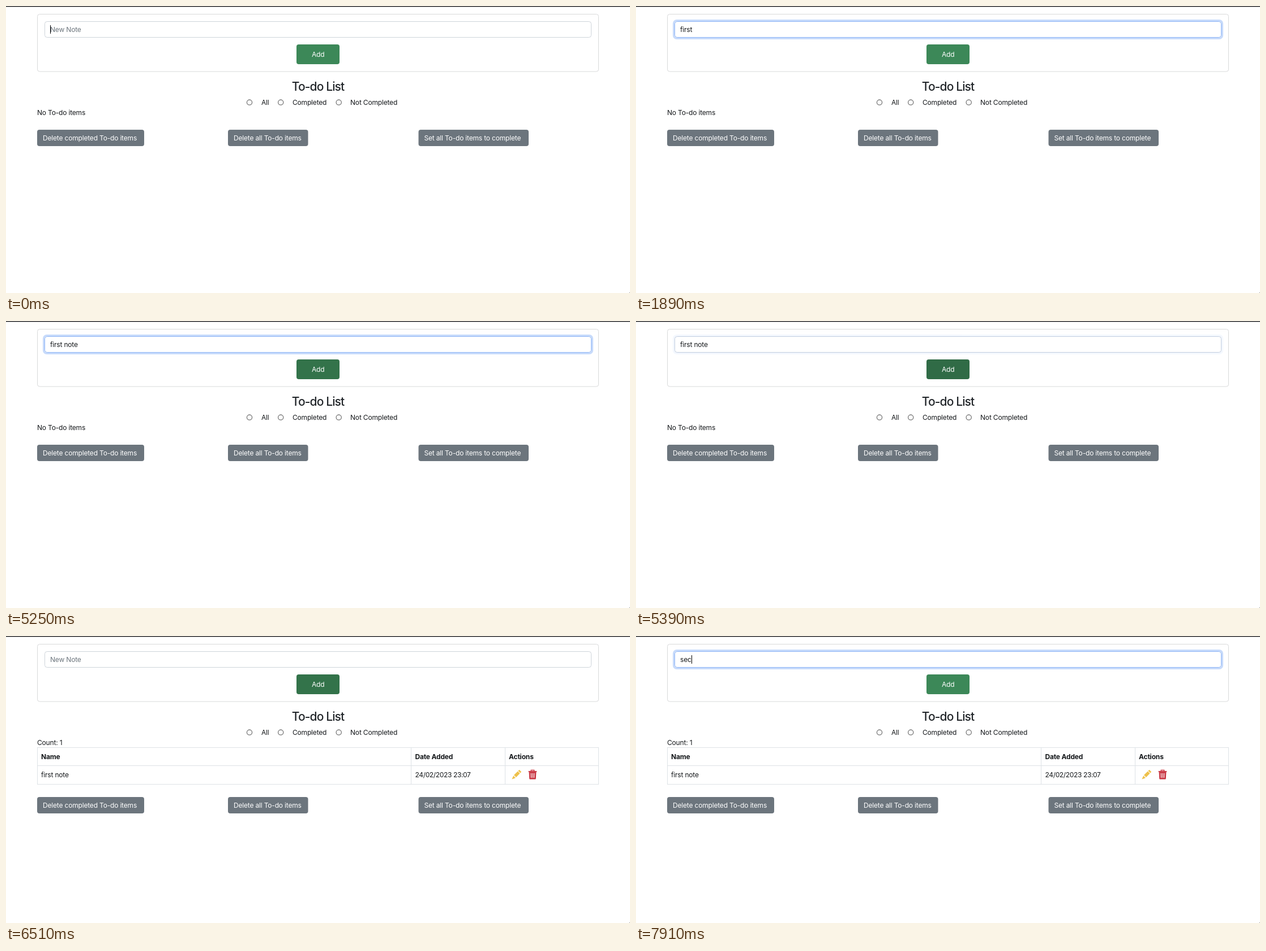
An HTML page that plays this animation: 1102x508 px, repeating every 8000 ms.

```html
<!DOCTYPE html>
<html lang="en">
<head>
<meta charset="utf-8">
<title>To-do List</title>
<style>
  html, body { margin: 0; width: 100%; height: 100%; overflow: hidden; background: #fff; }
  svg { display: block; width: 1102px; height: 508px; }
  text {
    font: 12px Inter, "Open Sans", sans-serif;
    font-optical-sizing: none;
    letter-spacing: -.015em;
    fill: #15181b;
    white-space: pre;
  }
  .title { font-size: 21px; font-weight: 500; letter-spacing: -.042em; text-anchor: middle; fill: #212529; }
  .head { font-weight: 700; }
  .date { letter-spacing: -.03em; }
  .hint { fill: #6c757d; }
  .light, .buttons text { fill: #fff; }
  .buttons rect { fill: #6c757d; }
  .line { fill: none; stroke: #dee2e6; }
  .radio { fill: #fff; stroke: #767676; stroke-width: 1.3; }

  .ring, .add, .empty, .list, .base, .icons, .buttons { animation: 8s steps(1) infinite; }
  .ring { animation-name: focus; }
  .add { animation-name: press; }
  .empty { animation-name: leave; }
  .list { animation-name: enter; }
  .icons { animation-name: icons; }
  .base { animation-name: grow; }
  .buttons { animation-name: shift; }

  @keyframes focus {
    0% { opacity: 0; }
    .875% { opacity: .35; }
    1.75% { opacity: .8; }
    2.625% { opacity: 1; }
    66.5% { opacity: .65; }
    67.375% { opacity: .2; }
    68.25% { opacity: 0; }
    86.625% { opacity: .35; }
    87.5% { opacity: .8; }
    88.375%, 100% { opacity: 1; }
  }
  @keyframes press {
    0% { fill: #3c8858; }
    63% { fill: #388051; }
    63.875% { fill: #34764c; }
    64.75% { fill: #33734a; }
    66.5% { fill: #317048; }
    67.375% { fill: #306b46; }
    69.125% { fill: #317048; }
    70% { fill: #33734a; }
    82.25% { fill: #367a50; }
    83.125% { fill: #3a8455; }
    84%, 100% { fill: #3c8858; }
  }
  @keyframes leave { 0% { opacity: 1; } 68.25%, 100% { opacity: 0; } }
  @keyframes enter { 0% { opacity: 0; } 68.25%, 100% { opacity: 1; } }
  @keyframes icons { 0% { opacity: 0; } 69.125%, 100% { opacity: 1; } }
  @keyframes grow { 0% { transform: none; } 69.125%, 100% { transform: translateY(1px); } }
  @keyframes shift {
    0% { transform: none; }
    68.25% { transform: translateY(64px); }
    69.125%, 100% { transform: translateY(66px); }
  }
</style>
</head>
<body>
<svg viewBox="0 0 1102 508">
  <rect width="1102" height="1.4" fill="#1b1b1d"/>
  <rect x="1101" y="507" width="1" height="1" fill="#777"/>

  <rect x="55.5" y="14.5" width="991" height="101.5" rx="4" fill="#fff" stroke="#d8d9da"/>
  <rect x="68.5" y="27.5" width="965" height="28" rx="4" fill="#fff" stroke="#ced4da"/>
  <g class="ring">
    <rect x="66.5" y="25.5" width="969" height="32" rx="5.5" fill="none" stroke="#c6dafb" stroke-width="3"/>
    <rect x="68.5" y="27.5" width="965" height="28" rx="4" fill="#fff" stroke="#8fb6f6"/>
  </g>
  <text id="field" x="78" y="46"></text>
  <rect id="caret" y="34" width="1" height="15"/>

  <rect class="add" x="513" y="68" width="76" height="35" rx="4"/>
  <text class="light" x="540" y="90.3">Add</text>

  <text class="title" x="551" y="150">To-do List</text>
  <circle class="radio" cx="430" cy="170.6" r="4.6"/>
  <text x="451" y="174.5">All</text>
  <circle class="radio" cx="485.2" cy="170.6" r="4.6"/>
  <text x="506" y="174.5">Completed</text>
  <circle class="radio" cx="587.7" cy="170.6" r="4.6"/>
  <text x="608" y="174.5">Not Completed</text>

  <text class="empty" x="55" y="192.7">No To-do items</text>

  <g class="list">
    <text x="55" y="192.7">Count: 1</text>
    <path class="line" d="M55 197.5H1047M55 229.5H1047M55.5 197V231M715.5 197V231M881.5 197V231M1046.5 197V231"/>
    <path class="line base" d="M55 261.5H1047M55.5 230V262M715.5 230V262M881.5 230V262M1046.5 230V262"/>
    <text class="head" x="62" y="218">Name</text>
    <text class="head" x="722.5" y="218">Date Added</text>
    <text class="head" x="888" y="218">Actions</text>
    <text x="62" y="250">first note</text>
    <text class="date" x="722.5" y="250">24/02/2023 23:07</text>
  </g>

  <g class="icons">
    <path transform="translate(893.4 236.8) scale(1.05)" fill="#eec14a"
      d="M12.5 0L16 3.5 14.2 5.5 10.5 1.8zM9.8 2.5L13.5 6.2 7 12.7V12H6V11H5V10H4V9H3.3zM2.6 9.9H3V11H4V12H5V13H6V13.5L5.6 13.9 0 16z"/>
    <g transform="translate(922 236.5)" fill="none" stroke="#c93845">
      <path d="M5.2 2.6V1H10.8V2.6" stroke-width="1.3"/>
      <path d="M.6 3.3H15.4" stroke-width="1.7"/>
      <path d="M2 4H14L13.2 16.6H2.8z" fill="#c93845" stroke-width="1" stroke-linejoin="round"/>
      <path d="M5.2 6.2L5.5 14.6M8 6.2V14.6M10.8 6.2L10.5 14.6" stroke="#fff" stroke-width="1.1"/>
    </g>
  </g>

  <g class="buttons">
    <rect x="55" y="219" width="189" height="29" rx="4"/>
    <text x="65" y="238">Delete completed To-do items</text>
    <rect x="392" y="219" width="141.5" height="29" rx="4"/>
    <text x="402" y="238">Delete all To-do items</text>
    <rect x="728.5" y="219" width="194.5" height="29" rx="4"/>
    <text x="738.5" y="238">Set all To-do items to complete</text>
  </g>
</svg>
<script>
  const LOOP = 8000;
  // [ms, typed text, caret shown]
  const steps = [
    [0, "", 1], [630, "", 0],
    [840, "f", 1], [910, "fi", 1], [1050, "fir", 1], [1190, "firs", 1], [1260, "first", 1],
    [1820, "first", 0],
    [2030, "first ", 1], [2170, "first n", 1], [2310, "first no", 1], [2450, "first not", 1],
    [2660, "first note", 1], [2800, "first notes", 1],
    [3220, "first notes", 0], [3570, "first notes", 1],
    [4200, "first note", 1], [4760, "first note", 0],
    [5460, "", 0], [6930, "", 1],
    [7420, "s", 1], [7630, "se", 1], [7910, "sec", 1]
  ];
  const field = document.getElementById("field");
  const caret = document.getElementById("caret");
  const start = performance.now();

  function draw() {
    const time = (performance.now() - start) % LOOP;
    const [, typed, shown] = steps.findLast(step => step[0] <= time);
    field.textContent = typed || "New Note";
    field.classList.toggle("hint", !typed);
    const end = typed ? field.getComputedTextLength() : 0;
    caret.setAttribute("x", Math.round(78 + end));
    caret.setAttribute("opacity", shown);
    requestAnimationFrame(draw);
  }
  draw();
</script>
</body>
</html>
```
